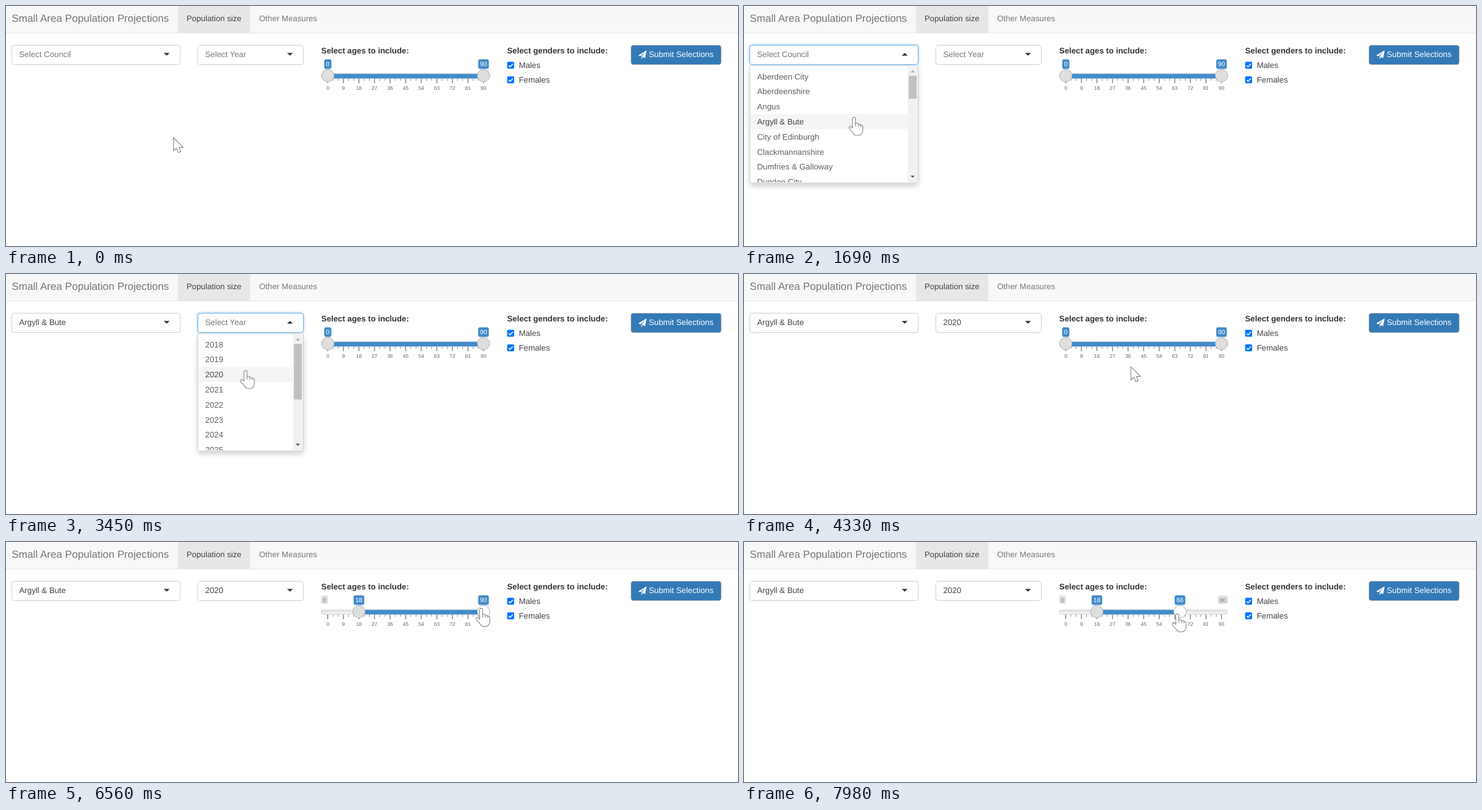
Animation of 1200x395 px, one loop 8 s. Source, as an HTML page:

```html
<!DOCTYPE html>
<html lang="en">
<head>
<meta charset="utf-8">
<title>Small Area Population Projections</title>
<style>
  html, body { margin: 0; width: 100%; height: 100%; overflow: hidden; background: #fff; }
  svg { display: block; width: 100%; height: 100%; }
  text { font: 13.28px "Liberation Sans", Arial, sans-serif; fill: #444; text-rendering: geometricPrecision; }
  .title { font-size: 17.13px; fill: #777; }
  .muted { fill: #777; }
  .bold { font-weight: bold; fill: #333; }
  .white { fill: #fff; }
  .badge { font-size: 10.4px; fill: #fff; text-anchor: middle; }
  .limit { font-size: 9.5px; fill: #777; text-anchor: middle; }
  .grid { font-size: 8.53px; fill: #666; text-anchor: middle; }
</style>
</head>
<body>
<svg viewBox="0 0 1200 395">
  <defs>
    <filter id="glow" x="-10%" y="-50%" width="120%" height="200%">
      <feDropShadow dx="0" dy="0" stdDeviation="2.5" flood-color="#66afe9" flood-opacity=".7"/>
    </filter>
    <filter id="shadow" x="-10%" y="-10%" width="120%" height="125%">
      <feDropShadow dx="0" dy="5" stdDeviation="4" flood-opacity=".18"/>
    </filter>
    <linearGradient id="track" x2="0" y2="1">
      <stop stop-color="#e2e2e2"/><stop offset="1" stop-color="#f6f6f6"/>
    </linearGradient>
    <clipPath id="listClip"><rect y="98" width="1200" height="192"/></clipPath>
  </defs>
  <g id="page"></g>
  <g id="live"></g>
</svg>
<script>
const LOOP = 8000, STEP = 80;
const ROW_TOP = 103.7, ROW_HEIGHT = 24.77;
const AGE_X = 527.5, AGE_STEP = 2.837, MAX_AGE = 90;

const council = { x: 9.5, w: 276, opens: 700, closes: 1850, prompt: "Select Council", pick: 3, thumb: 37.5,
  options: ["Aberdeen City", "Aberdeenshire", "Angus", "Argyll &amp; Bute", "City of Edinburgh",
    "Clackmannanshire", "Dumfries &amp; Galloway", "Dundee City"] };
const year = { x: 314.5, w: 173, opens: 2570, closes: 3760, prompt: "Select Year", pick: 2, thumb: 91.5,
  options: Array.from({ length: 8 }, (_, i) => 2018 + i) };

// Pointer strokes: each bends through a control point and eases out at its end
const home = [274, 216];
const dragLow = { start: 5210, end: 5530, bend: [558, 121], to: [578, 120] };
const dragHigh = { start: 7350, end: 7980, bend: [745, 114], to: [711, 118] };
const strokes = [
  { start: 80, end: 710, bend: [242, 150], to: [210, 84] },
  { start: 1050, end: 1430, bend: [225, 144], to: [181, 183] },
  { start: 2090, end: 2570, bend: [445, 129], to: [413, 78] },
  { start: 3130, end: 3760, bend: [441, 129], to: [384, 165] },
  { start: 4250, end: 4970, bend: [815, 160], to: [528, 121] },
  dragLow,
  { start: 6020, end: 6650, bend: [945, 150], to: [779, 109] },
  dragHigh
];

function progress({ start, end }, t) {
  if (t < start) return 0;
  const count = Math.round((end - start) / STEP);
  const step = Math.floor((t - start) / (end - start) * count + .2);
  return 1 - (1 - Math.min(1, (step + 1) / (count + 1))) ** 3;
}

function pointerAt(t) {
  let at = home;
  for (const stroke of strokes) {
    const p = progress(stroke, t), q = 1 - p;
    at = at.map((v, i) => q * q * v + 2 * q * p * stroke.bend[i] + p * p * stroke.to[i]);
  }
  return at;
}

const text = (x, y, content, cls = "") => `<text x="${x}" y="${y}" class="${cls}">${content}</text>`;
const rect = (x, y, w, h, fill, rest = "") =>
  `<rect x="${x}" y="${y}" width="${w}" height="${h}" fill="${fill}" ${rest}/>`;
const path = (d, fill, rest = "") => `<path d="${d}" fill="${fill}" ${rest}/>`;
// Small triangle centred on x; dir 1 points down, -1 up
const triangle = (x, y, half, dir, fill) =>
  path(`M${x - half} ${y - dir * half / 2}h${2 * half}l${-half} ${dir * half}z`, fill);

function checkbox(y, label) {
  return rect(821.5, y, 11.5, 11.5, "#0075ff", 'rx="2"') +
    path(`M824 ${y + 6}l2.3 2.4 4.6 -5`, "none", 'stroke="#fff" stroke-width="1.6"') +
    text(840.7, y + 10, label);
}

function staticPage() {
  return rect(0, 0, 1200, 44, "#f8f8f8") + rect(0, 44, 1200, 1, "#e7e7e7") +
    rect(282, 0, 118.5, 44, "#e7e7e7") +
    text(9.3, 26, "Small Area Population Projections", "title") +
    text(296, 25, "Population size") +
    text(415, 25, "Other Measures", "muted") +
    text(516.8, 78, "Select ages to include:", "bold") +
    text(821.5, 78, "Select genders to include:", "bold") +
    checkbox(91.8, "Males") + checkbox(115.8, "Females") +
    rect(1024.5, 64.5, 148, 32, "#337ab7", 'rx="4" stroke="#bbb"') +
    path("M1050.3 73L1036.5 81.2 1040 82.7 1047.8 75.6 1041.6 83.4 1047.8 85.8zM1041.6 84.4V87.3L1044 85.3z", "#fff") +
    text(1053.7, 84.4, "Submit Selections", "white");
}

function dropdown({ x, w, options, thumb }, active) {
  const barX = x + w - 17, mid = barX + 8;
  const rows = options.map((option, i) => {
    const y = ROW_TOP + i * ROW_HEIGHT, on = i === active;
    return (on ? rect(x + .5, y, w - 17.5, ROW_HEIGHT, "#f5f5f5") : "") +
      `<g opacity="${on ? 1 : .85}">${text(x + 12, y + 17, option)}</g>`;
  }).join("");
  return path(`M${x} 98h${w}v189q0 4 -4 4h${8 - w}q-4 0 -4 -4z`, "#fff", 'stroke="#d0d0d0" filter="url(#shadow)"') +
    `<g clip-path="url(#listClip)">${rows}` +
    rect(barX, 98, 16.5, 193, "#f1f1f1") + rect(barX + 1.5, 115, 13, thumb, "#c1c1c1") +
    triangle(mid, 107.5, 3.5, -1, "#a3a3a3") + triangle(mid, 281, 3.5, 1, "#505050") + "</g>";
}

const isOpen = (select, t) => t >= select.opens && t < select.closes;

function selectBox(select, t, hovered) {
  const { x, w, opens, closes, prompt, options, pick } = select;
  const open = isOpen(select, t), chosen = t >= closes;
  const caretLit = open && (t - opens) % 1000 < 500;
  return rect(x, 64.5, w, 32, "#fff", 'rx="4" ' + (open ? 'stroke="#66afe9" filter="url(#glow)"' : 'stroke="#ccc"')) +
    text(x + 12, 84.4, chosen ? options[pick] : prompt, chosen ? "" : "muted") +
    triangle(x + w - 22, 79.5, 4.7, open ? -1 : 1, "#333") +
    (caretLit ? rect(x + 12, 73, 1, 14.5, "#333") : "") +
    (open ? dropdown(select, hovered) : "");
}

const ageX = age => AGE_X + age * AGE_STEP;

function handle(age, hot) {
  const x = ageX(age), w = age > 9 ? 17.4 : 11.8;
  return `<circle cx="${x}" cy="114.5" r="10.2" fill="${hot ? "#fff" : "#dedede"}" stroke="#b3b3b3"/>` +
    rect(x - w / 2, 87.7, w, 15.8, "#428bca", 'rx="3"') + text(x, 99.2, age, "badge");
}

const limit = (x, w, age) => rect(x, 88, w, 14, "#e1e1e1", 'rx="3"') + text(x + w / 2, 98.5, age, "limit");

function slider(low, high, lowHot, highHot) {
  let out = rect(516.8, 112, 275.7, 7, "url(#track)", 'rx="3.5" stroke="#ccc" stroke-width=".9"');
  for (let age = 0; age <= MAX_AGE; age += 3) {
    const big = age % 9 === 0, x = ageX(age);
    out += rect(x - .45, 119.4, .95, big ? 7.6 : 3.8, big ? "#444" : "#888");
    if (big) out += text(x, 138.2, age, "grid");
  }
  out += rect(ageX(low), 111.6, ageX(high) - ageX(low), 7.6, "#428bca");
  if (low > 4) out += limit(516.5, 11.5, 0);
  if (high < 84) out += limit(777, 16, MAX_AGE);
  return out + handle(low, lowHot) + handle(high, highHot);
}

function pointer(x, y, hand) {
  const shape = hand
    ? "M-3.2 2.5a2.5 2.5 0 0 1 5 0V10q4 -1 4.5 1.5q3.5 -.5 4 1.5q3.5 -.3 3.5 3V21q-.5 9 -8 9h-2" +
      "q-4 0 -6 -4l-6 -7q-1.5 -3 1 -4q2 -.5 4 3zM1.8 10v5M6.3 11.5v4M10.3 13v3"
    : "M.5 .5V22.5L5.3 18 8.6 25.3 12.6 23.6 9.6 16.6H16.5z";
  return `<g transform="translate(${x} ${y})">` +
    path(shape, "#fff", 'stroke="#858585" stroke-width="1.1" stroke-linejoin="round"') + "</g>";
}

function scene(t) {
  const [x, y] = pointerAt(t);
  const low = Math.floor(18 * progress(dragLow, t));
  const high = Math.round(MAX_AGE - 24 * progress(dragHigh, t));
  const onHandle = age => Math.abs(x - ageX(age)) < 12 && y < 126;
  const lowHot = onHandle(low), highHot = onHandle(high);
  // The hand stays for a moment after the year list closes
  const onList = isOpen(council, t) || isOpen(year, t) || isOpen(year, t - 170);
  const hovered = Math.max(0, Math.floor((y - 108) / ROW_HEIGHT));

  return selectBox(council, t, hovered) + selectBox(year, t, hovered) +
    slider(low, high, lowHot, highHot) +
    pointer(x, y, onList || lowHot || highHot || y < 98);
}

const live = document.getElementById("live");
document.getElementById("page").innerHTML = staticPage();

const began = performance.now();
function tick() {
  live.innerHTML = scene((performance.now() - began) % LOOP);
  requestAnimationFrame(tick);
}
tick();
</script>
</body>
</html>
```
